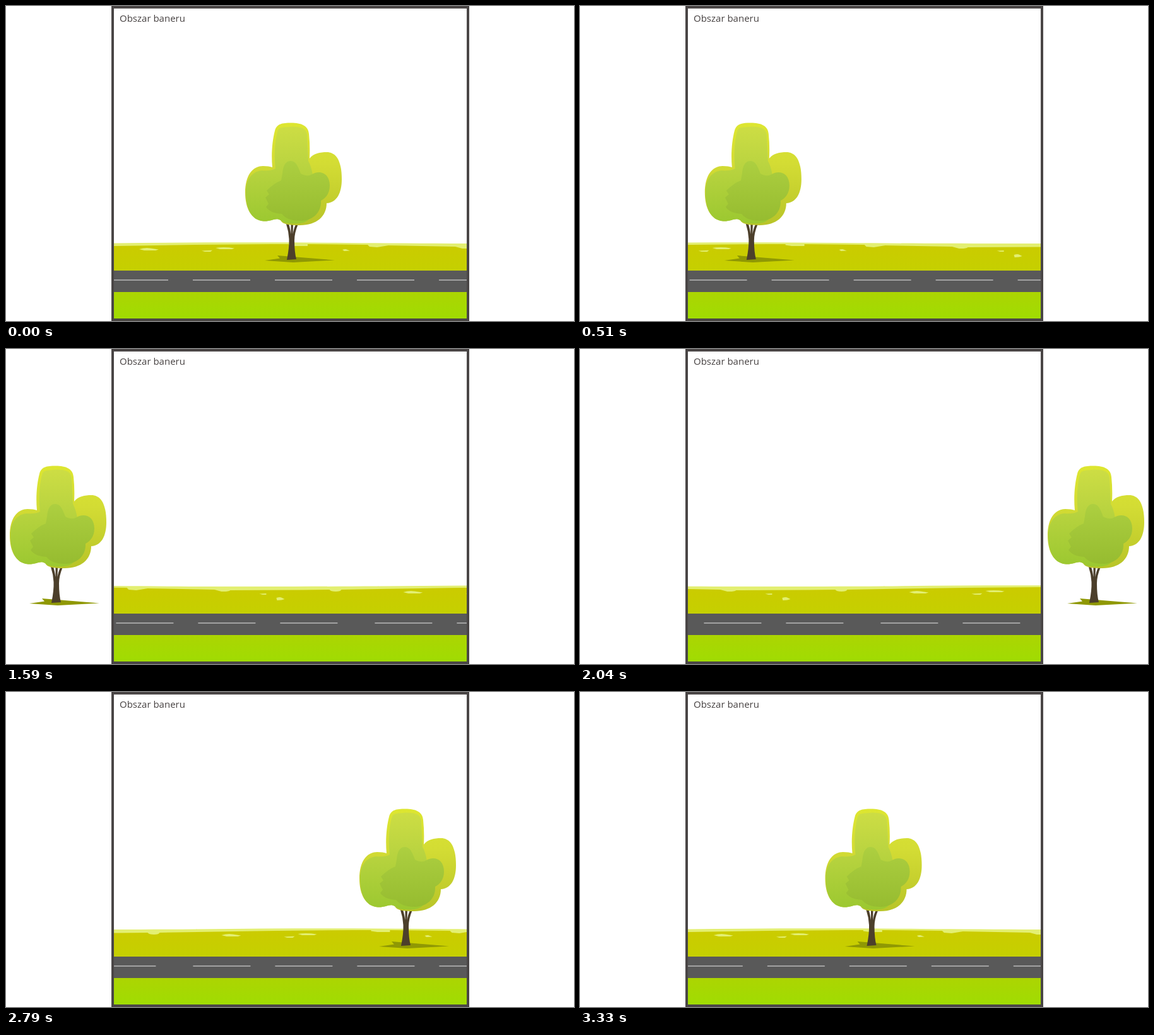
An HTML page that plays this animation: 900x500 px, repeating every 3360 ms.

```html
<!DOCTYPE html>
<html lang="pl">
<head>
<meta charset="utf-8">
<title>Obszar baneru</title>
<style>
  html, body { margin: 0; width: 100%; height: 100%; overflow: hidden; background: #fff; }
  svg { display: block; }
  text { font: 15px "Open Sans", "Noto Sans", sans-serif; fill: #464141; }
</style>
</head>
<body>
<svg width="900" height="500" viewBox="0 0 900 500">
  <defs>
    <linearGradient id="field" x2="0" y2="1">
      <stop stop-color="#cbcb00"/><stop offset="1" stop-color="#c5d000"/>
    </linearGradient>
    <linearGradient id="verge" x2="0" y2="1">
      <stop stop-color="#acd502"/><stop offset="1" stop-color="#a0dc02"/>
    </linearGradient>
    <linearGradient id="rim" x2="0" y2="1">
      <stop stop-color="#dde630"/><stop offset=".4" stop-color="#d3dc34"/><stop offset="1" stop-color="#b8c428"/>
    </linearGradient>
    <linearGradient id="leaf" x2="0" y2="1">
      <stop stop-color="#cddd44"/><stop offset=".4" stop-color="#bad440"/><stop offset="1" stop-color="#9bc830"/>
    </linearGradient>
    <linearGradient id="core" x2="0" y2="1">
      <stop stop-color="#adcf40"/><stop offset="1" stop-color="#96bc30"/>
    </linearGradient>
    <clipPath id="window"><path d="M171 4H730V496H171z"/></clipPath>
  </defs>

  <g clip-path="url(#window)">
    <path fill="url(#field)" d="M171 378H730V421H171z"/>
    <path fill="#595959" d="M171 420H730V454H171z"/>
    <path fill="url(#verge)" d="M171 454H730V496H171z"/>
    <g id="ground">
      <g id="strip">
        <path fill="#e3ef72" d="M171 376.5C300 375 420 375 540 376S800 377.5 972 376.5V381L913 382q-1 3-9 3t-10-3L850 382.5 737 383q-3 2.500-14 2L712 382 606 380 588 383 576 382 573 379 478 378v3h-20l-10-1.500V378H420L300 379 171 381z
          M211 386q10-3 18-1.500l13 2-5 1.500h-18z
          M310 388.500l17-.8-3 2.300h-9z
          M332 384q14-2 30 .5l-4 1.500h-19z
          M533 387q5-2 8 0l4 1.500-9 .5z
          M783 388.500l11-.5v2h-6z
          M810 395q6-2 9 0l4 2-5 1.500-7 .5z"/>
        <path d="M166 435H907" stroke="#a2a2a2" stroke-width="2" stroke-dasharray="91 39"/>
      </g>
      <use href="#strip" x="800"/>
    </g>
  </g>

  <g id="tree">
    <path fill="#8f9804" d="M410 404 434 400.500 430 396 521 403.500 455 407z"/>
    <path fill="#4c3f2b" d="M445 403Q449 383 448.500 370 448 358 444 346L448 346Q450 352 451.500 362L451.500 346H455L454.500 362Q456 353 459 347L463 346Q457 360 457 372 457 390 460 402z"/>
    <path fill="url(#rim)" d="M422 256C420 235 422 213 426 198 429 187 437 185.500 452 185.500 468 185.500 479 190 480 203Q482 222 481 242C487 234 498 232 508 232 528 232 532 255 532 275 532 297 524 312 508 313 508 334 492 348 466 348 450 348 438 347 435 340 427 335 422 342 408 341.500 388 340 379 320 379 296 379 270 390 254 407 254Q417 254 422 256z"/>
    <path fill="url(#leaf)" d="M427 258C424 235 427 208 431 197 433 192 440 193 452 191.500 468 191 476 195 477 204L479 246Q487 260 488 290C490 315 490 342 466 345 450 346 440 345 435 340 427 335 422 342 408 341.500 388 340 380 320 380 296 380 274 391 262 406 261Q420 262 427 258z"/>
    <path fill="url(#core)" d="M438 266C439 252 444 246 451 246 460 246 463 256 467 266Q478 272 485 267C497 260 513 265 513 285 513 297 507 305 499 309 500 327 487 341 466 341 451 341 443 337 437 330 423 329 416 325 412 319L416 314 411 304 417 299 413 293Q425 281 436 277z"/>
  </g>

  <path d="M169 2H732V498H169z" fill="none" stroke="#4a4646" stroke-width="4"/>
  <text x="180" y="25">Obszar baneru</text>
</svg>
<script>
  const LOOP = 3360, STEP = 30;
  const ground = document.getElementById("ground");
  const tree = document.getElementById("tree");

  // The tree leaves to the left, waits, then returns from the right.
  function treeShift(t) {
    if (t < 1620) return -373 * Math.min(t / 1050, 1);
    return 362 * Math.min((LOOP - t) / 1140, 1);
  }

  function move(node, x) {
    node.setAttribute("transform", `translate(${x})`);
  }

  function draw() {
    const t = Math.floor(performance.now() % LOOP / STEP) * STEP;
    move(ground, -0.24 * t);
    move(tree, treeShift(t));
    requestAnimationFrame(draw);
  }
  draw();
</script>
</body>
</html>
```
